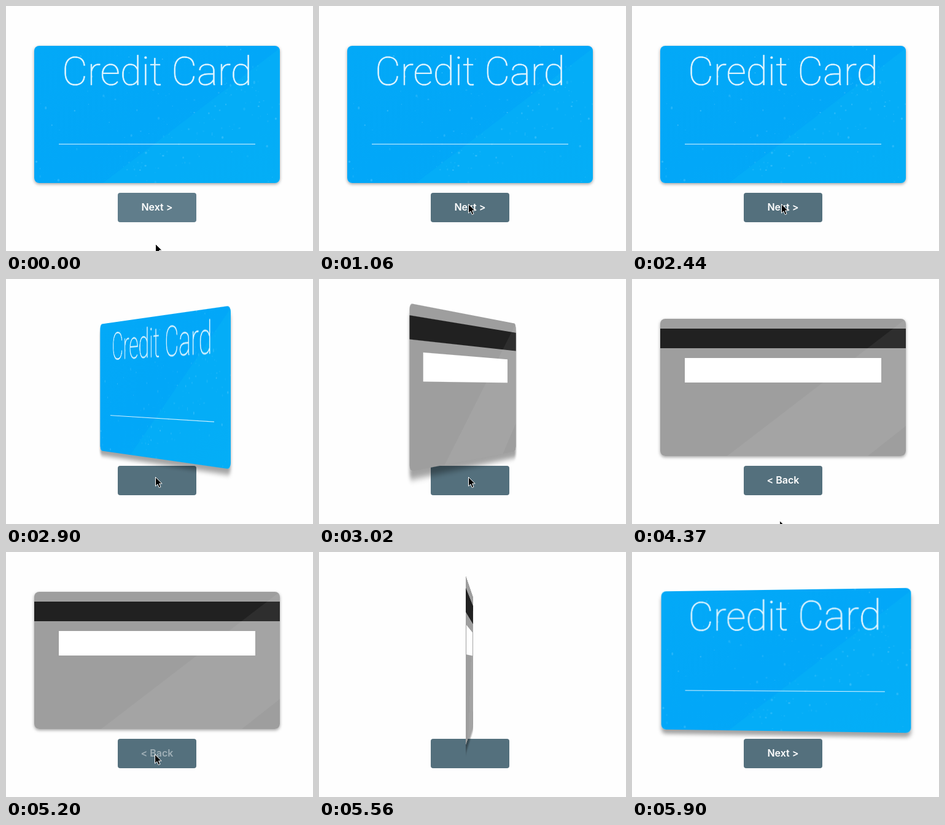
An HTML page for the animation above (6000 ms loop, 500 by 400 pixels).

```html
<!DOCTYPE html>
<html lang="en">
<head>
<meta charset="utf-8">
<title>Card flip</title>
<style>
  html, body { margin: 0; width: 100%; height: 100%; overflow: hidden; background: #fefefe; }
  #stage { position: relative; width: 500px; height: 400px; overflow: hidden; }
  #button {
    position: absolute; left: 182px; top: 305px; width: 128px; height: 48px;
    border-radius: 4px; color: #fff; text-align: center;
    font: 600 16px/47px Inter, Roboto, sans-serif;
  }
  #scene {
    position: absolute; left: 46px; top: 65px; width: 400px; height: 224px;
    perspective: 1400px; perspective-origin: 50% 50%;
  }
  #card { position: absolute; inset: 0; transform-style: preserve-3d; }
  .face { position: absolute; inset: 0; border-radius: 8px; backface-visibility: hidden; }
  .face svg { display: block; border-radius: 8px; }
  #back { transform: rotateY(180deg); }
  #pointer { position: absolute; left: 0; top: 0; overflow: visible; }
</style>
</head>
<body>
<div id="stage">
  <div id="button"><span id="label">Next &gt;</span></div>
  <div id="scene">
    <div id="card">
      <div class="face" id="front">
        <svg width="400" height="224">
          <defs>
            <linearGradient id="blue" x1="0" y1="0" x2="1" y2="1">
              <stop offset="0" stop-color="#03a9f7"/>
              <stop offset=".5" stop-color="#02a7f8"/>
              <stop offset="1" stop-color="#03a9f6"/>
            </linearGradient>
          </defs>
          <rect width="400" height="224" fill="url(#blue)"/>
          <path d="M112 224 400 4V224Z" fill="#06b4f8" opacity=".5"/>
          <g id="specks" fill="#8fdcff"></g>
          <text x="200" y="64" text-anchor="middle" font-family="Roboto, sans-serif"
                font-size="64" font-weight="100" fill="#fff" stroke="#fff"
                stroke-width=".7" opacity=".88">Credit Card</text>
          <rect x="40" y="160" width="320" height="1" fill="#fff" opacity=".85"/>
        </svg>
      </div>
      <div class="face" id="back">
        <svg width="400" height="224">
          <rect width="400" height="224" fill="#9e9e9e"/>
          <rect y="16" width="400" height="32" fill="#212121"/>
          <path d="M109 224 400 0V175L338 224Z" fill="#fff" opacity=".06"/>
          <rect x="40" y="64" width="320" height="40" fill="#fff"/>
        </svg>
      </div>
    </div>
  </div>
  <svg id="pointer" width="14" height="20">
    <path d="M.5 .5V15.2L3.9 12 6.3 17.6 9 16.4 6.6 11H11.2Z" fill="#000" stroke="#fff" stroke-width="1"/>
  </svg>
</div>
<script>
const LOOP = 6000, FLIP = 800;
const FLIP_OUT = 2728, FLIP_BACK = 5330;
const $ = id => document.getElementById(id);
const clamp = v => Math.min(1, Math.max(0, v));
const progress = (t, start, length) => clamp((t - start) / length);
const mix = (a, b, u) => a + (b - a) * u;
const easeOut = u => 1 - (1 - u) ** 2;

// cubic-bezier(.25, .1, .25, 1)
function ease(x) {
  const curve = (a, b, s) => 3 * a * s * (1 - s) ** 2 + 3 * b * s * s * (1 - s) + s ** 3;
  let low = 0, high = 1;
  for (let i = 0; i < 24; i++) {
    const mid = (low + high) / 2;
    if (curve(.25, .25, mid) < x) low = mid; else high = mid;
  }
  return curve(.1, 1, low);
}

// Lift towards the viewer: quick rise, slower settling
function lift(x) {
  const peak = .32;
  return 78 * (x < peak ? x / peak : 1 - ((x - peak) / (1 - peak)) ** 1.4);
}

function addSpecks() {
  let seed = 11;
  const random = () => (seed = seed * 16807 % 2147483647) / 2147483647;
  let marks = "";
  for (let i = 0; i < 210; i++) {
    const along = random();
    const nearBand = random() < .55;
    const x = nearBand ? mix(140, 390, along) : random() * 400;
    const y = nearBand ? mix(190, 50, along) + (random() - .4) * 110 : random() * 224;
    const size = .5 + 1.3 * random() ** 2;
    const alpha = .06 + .3 * random() ** 2;
    marks += `<ellipse cx="${x.toFixed(1)}" cy="${y.toFixed(1)}" rx="${size.toFixed(2)}" ` +
      `ry="${(size * mix(.7, 1.6, random())).toFixed(2)}" opacity="${alpha.toFixed(2)}"/>`;
  }
  $("specks").innerHTML = marks;
}

function pointerAt(t) {
  if (t < 60) return [243, 388];
  if (t < 520) return null;
  if (t < 3050) return [243, mix(400, 323, easeOut(progress(t, 520, 540)))];
  if (t < 3500) {
    const u = progress(t, 3050, 450);
    return [mix(243, 240, u), mix(323, 400, u)];
  }
  if (t < 4350) return null;
  if (t < 5240) {
    const u = easeOut(progress(t, 4350, 500));
    return [mix(240, 242, u), mix(400, 330, u)];
  }
  if (t < 5540) return [242, mix(330, 402, progress(t, 5240, 300))];
  return null;
}

function render(t) {
  const returning = t >= FLIP_BACK - 200;
  const start = returning ? FLIP_BACK : FLIP_OUT;
  const x = progress(t, start, FLIP);
  const turned = returning ? 1 - ease(x) : ease(x);
  const z = lift(x);
  $("card").style.transform = `translateZ(${z}px) rotateY(${-180 * turned}deg)`;
  const shadow = `0 ${2 + z * .12}px ${5 + z * .04}px rgba(0,0,0,.36)`;
  $("front").style.boxShadow = $("back").style.boxShadow = shadow;

  const swapped = t >= start + 350;
  $("label").textContent = returning === swapped ? "Next >" : "< Back";
  $("label").style.opacity = swapped
    ? ease(progress(t, start + 400, 160))
    : 1 - ease(progress(t, start - 175, 140));
  const hover = progress(t, 760, 150);
  $("button").style.background =
    `rgb(${mix(96, 84, hover)},${mix(125, 112, hover)},${mix(139, 125, hover)})`;

  const tip = pointerAt(t);
  $("pointer").style.visibility = tip ? "visible" : "hidden";
  if (tip) $("pointer").style.transform = `translate(${tip[0]}px,${tip[1]}px)`;
}

addSpecks();
const began = performance.now();
function tick() {
  render((performance.now() - began) % LOOP);
  requestAnimationFrame(tick);
}
tick();
</script>
</body>
</html>
```
